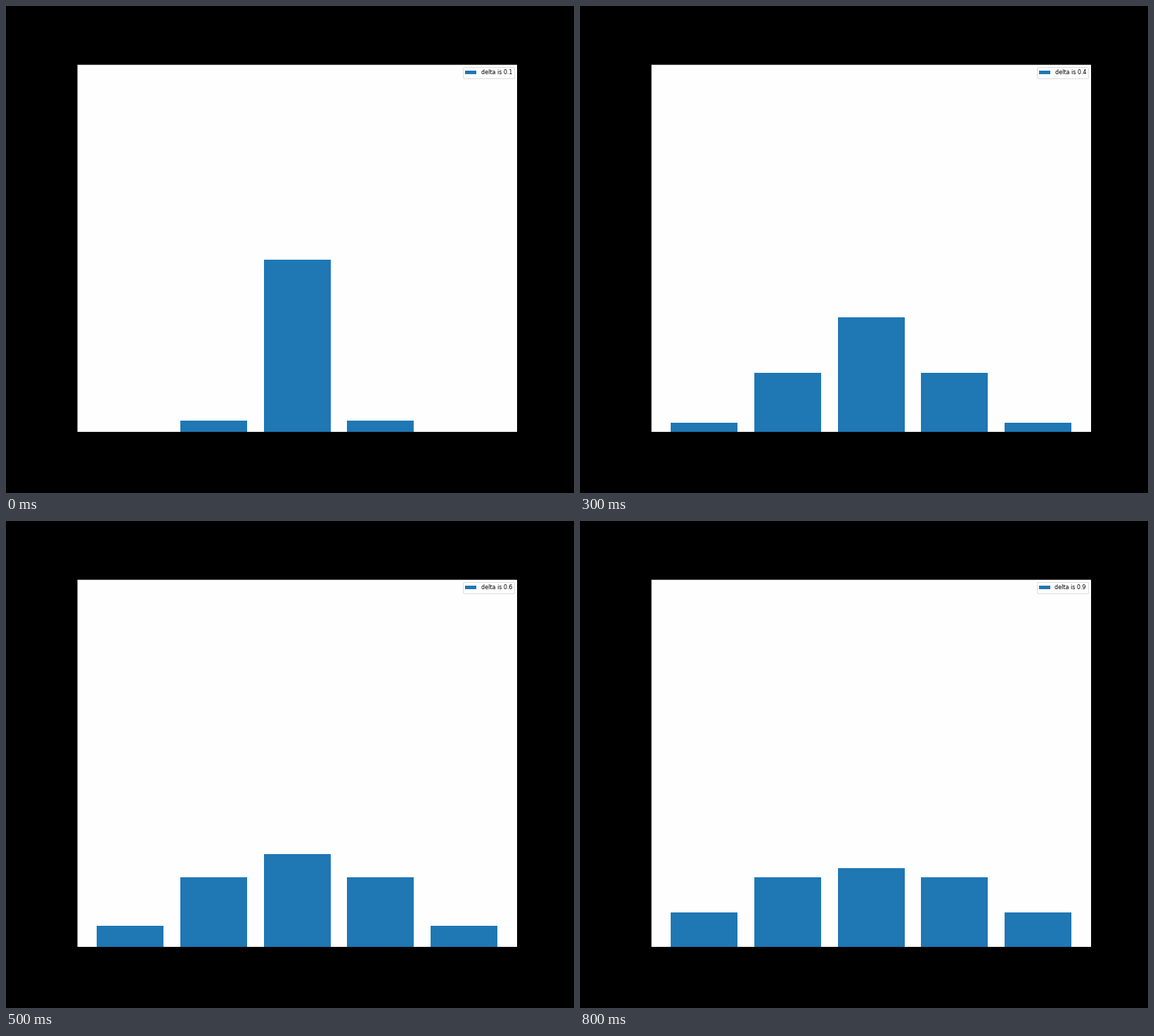
Write a matplotlib script that moves like this. It is 808 px wide and 693 px high and loops after 0.9 s.

```python
import matplotlib.pyplot as plt
import numpy as np
from matplotlib.animation import FuncAnimation

W, H, DPI = 808, 693, 64
PT = 0.9018  # points per nominal plot unit at this dpi
STEPS = 9

plt.rcParams.update({
    "font.family": "DejaVu Sans",
    "font.size": 10 * PT,
    "legend.fontsize": 10 * PT,
    "axes.linewidth": 0.8 * PT,
    "patch.linewidth": 1.0 * PT,
})

# Height of the middle bar for delta = 0.1 ... 0.9
PEAK = [0.469, 0.4212, 0.362, 0.3125, 0.276, 0.2527, 0.2358, 0.2238, 0.2147]


def heights(step):
    """Five symmetric bars; the middle and one flank add up to one half."""
    delta = (step + 1) / 10
    rest = 0.5 - PEAK[step]
    spread = 1.225 * delta ** 2
    ratio = spread / (1 + spread)
    side = rest / (1 + ratio)
    outer = rest - side
    return [outer, side, PEAK[step], side, outer]


fig = plt.figure(figsize=(W / DPI, H / DPI), dpi=DPI, facecolor="black")
ax = fig.add_axes([0.125, 0.125, 0.775, 0.755], facecolor="#fefefe")
ax.set(xlim=(-2.64, 2.64), ylim=(0, 1), xticks=[], yticks=[])

bars = ax.bar(np.arange(-2, 3), heights(0), width=0.8, color="#1f77b4",
              label="delta is 0.1")
legend = ax.legend(loc="upper right")
label = legend.get_texts()[0]


def draw(step):
    for bar, h in zip(bars, heights(step)):
        bar.set_height(h)
    label.set_text(f"delta is {(step + 1) / 10:.1f}")
    return [*bars, legend]


anim = FuncAnimation(fig, draw, frames=STEPS, interval=100,
                     repeat=True, repeat_delay=0, blit=False)
plt.show()
```
